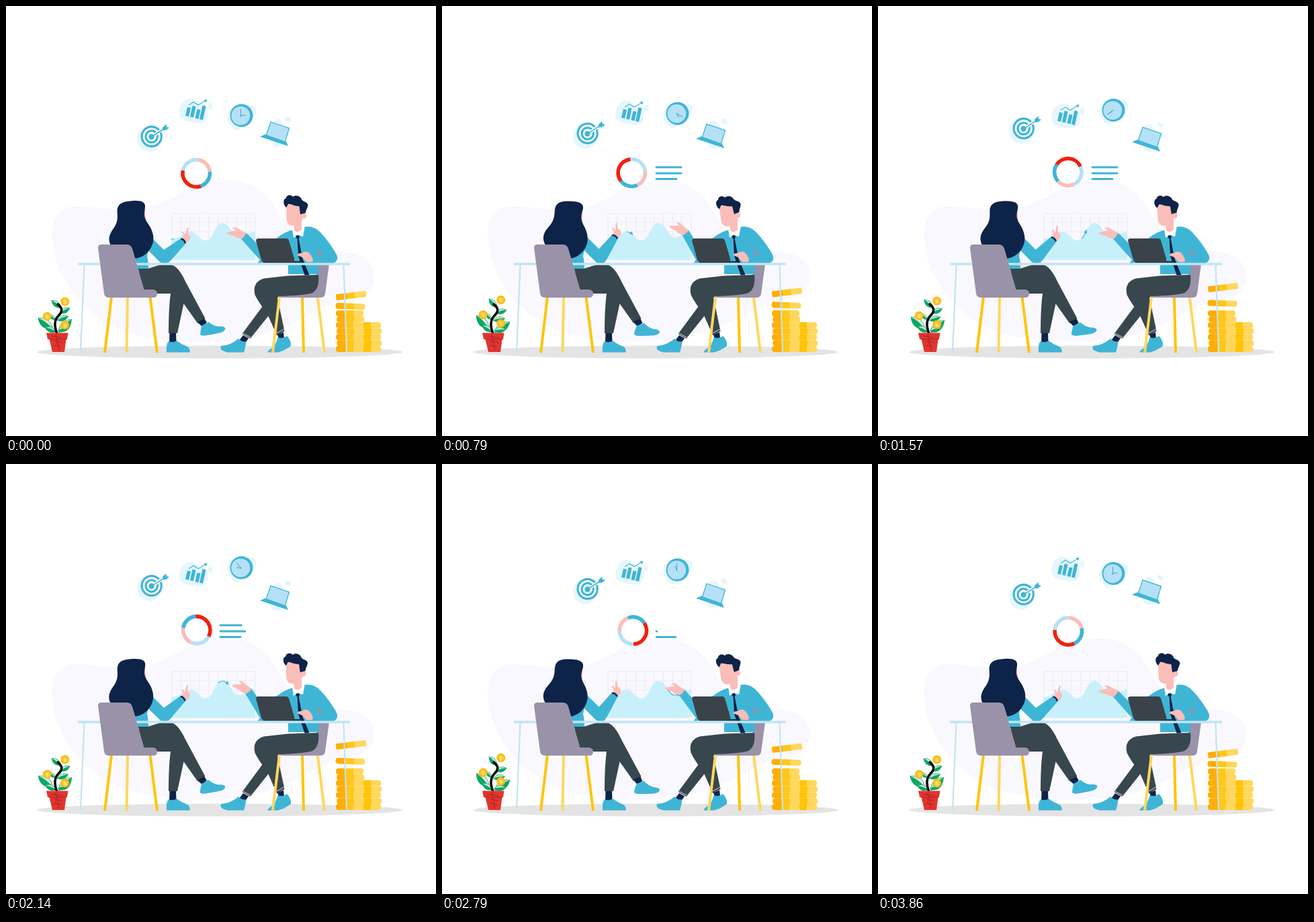
An HTML page for the animation above (3.93 s loop, 640x640 px).

```html
<!DOCTYPE html>
<html lang="en">
<head>
<meta charset="utf-8">
<style>
  html, body { margin: 0; width: 100%; height: 100%; overflow: hidden; background: #fff; }
  svg { display: block; width: 100vw; height: 100vh; }
  text { font: bold 8px "Liberation Sans", Arial, sans-serif; fill: #fff3b8; text-anchor: middle; }
  .teal { fill: #3fb5d6; } .navy { fill: #0e2348; } .skin { fill: #fbbdb7; }
  .dark { fill: #38464d; } .grey { fill: #9a92a9; } .pale { fill: #e6f6fd; } .sky { fill: #b5e1f7; }
  .line { fill: none; stroke: #3fb5d6; }
  .desk { stroke: #c2e4f1; }
  .gold { stroke: #ffc405; stroke-width: 4; } .lemon { stroke: #ffd75c; stroke-width: 4; }
</style>
</head>
<body>
<svg viewBox="0 0 640 640">
  <defs>
    <linearGradient id="coin">
      <stop offset=".36" stop-color="#ffae06"/><stop offset=".36" stop-color="#ffc71a"/>
      <stop offset=".63" stop-color="#ffc71a"/><stop offset=".63" stop-color="#ffd75c"/>
    </linearGradient>
    <linearGradient id="coin2">
      <stop offset=".36" stop-color="#ffd75c"/><stop offset=".36" stop-color="#ffc405"/>
      <stop offset=".63" stop-color="#ffc405"/><stop offset=".63" stop-color="#ffd75c"/>
    </linearGradient>
  </defs>

  <path fill="#f9f8ff" d="M68 340C68 310 85 296 110 298C150 301 180 307 212 300C250 290 280 259 330 259C375 259 398 290 415 325C430 355 460 362 500 365C535 368 550 385 548 405C545 430 525 434 495 441C450 453 430 480 360 494C290 505 220 500 170 482C110 455 70 400 68 340Z"/>
  <ellipse cx="318" cy="515" rx="272" ry="9.5" fill="#e4e4e4"/>

  <path id="grid" fill="none" stroke="#ebe7f6" stroke-width=".9"/>
  <path fill="#c8f0fa" d="M246 378V347C262 346 264 336 275 336C286 337 287 349 298 349C309 348 310 323 322 323C334 323 336 344 346 344C356 344 358 337 371 336V378Z"/>
  <path id="wave" class="line" stroke-width="1.2" d="M246 347C262 346 264 336 275 336C286 337 287 349 298 349C309 348 310 323 322 323C334 323 336 344 346 344C356 344 358 337 371 336"/>
  <path id="tip" class="teal" d="M0 0L-5 -2.8V2.8Z"/>

  <g id="target">
    <path class="pale" d="M197 190C203 176 222 176 230 186C238 198 226 217 213 217C198 215 192 203 197 190Z"/>
    <circle cx="216.7" cy="194.2" r="14.6" fill="#fff" stroke="#3fb5d6" stroke-width="3.2"/>
    <circle cx="216.7" cy="194.4" r="8.700" class="line" stroke-width="3.2"/>
    <circle cx="216.5" cy="194.7" r="4.200" class="teal"/>
    <path d="M221 192L234 183" stroke="#fff" stroke-width="4.5"/>
    <path class="line" stroke-width="1.6" d="M216 195L238 181"/>
    <path class="teal" d="M233 181L238 176L239 180L243 181L238 185L233 185Z"/>
  </g>

  <g id="chart">
    <path class="pale" d="M264 143C270 135 281 137 286 143C292 147 302 148 300 160C302 172 292 175 282 174C270 172 258 170 258 160C258 153 260 147 264 143Z"/>
    <ellipse class="pale" cx="304" cy="149" rx="3.5" ry="5.5"/>
    <path class="line" stroke-width="5.2" d="M269.5 164L272.5 151M276.5 165.5L280 149M284 167.5L287 154M290.5 169L295 148.500"/>
    <path class="line" stroke-width="1.1" d="M272 147.500L279 143L286 147.500L297 141"/>
    <path class="teal" d="M294.500 140L299.500 139L298 144Z"/>
  </g>

  <g id="clock">
    <path class="pale" d="M331 158C336 148 350 148 360 149C370 146 375 152 372 160C368 172 356 176 348 183C340 188 336 180 332 174C328 168 329 163 331 158Z"/>
    <circle cx="350.5" cy="163" r="17" class="teal"/>
    <circle cx="349.3" cy="163.3" r="13.9" class="sky"/>
    <path id="minute" class="line" style="stroke:#3d9fc0" stroke-width=".9" d="M349.500 164.500V153"/>
    <path id="hour" class="line" style="stroke:#3d9fc0" stroke-width=".9" d="M349.500 165V157"/>
  </g>

  <g id="laptop">
    <path class="pale" d="M396 176C398 166 408 165 411 174L418 200C414 210 402 212 396 206Z"/>
    <ellipse class="pale" cx="420" cy="169" rx="5" ry="3.6" transform="rotate(30 420 169)"/>
    <path class="sky" stroke="#3fb5d6" stroke-width="1.3" d="M394 172.500L421.500 182L415 203L387 193Z"/>
    <path class="teal" d="M378 194.500L386 191L417 202L420 208.500Z"/>
  </g>

  <g id="donut" fill="none" stroke-width="5.6"></g>
  <path id="bars" class="line" stroke-width="2.8" stroke-linecap="round"/>

  <!-- plant -->
  <g id="leaves"></g>
  <path fill="none" stroke="#0a0a0c" stroke-width="3.6" d="M76 488C71 475 72 467 78 461C85 454 84 449 76 443"/>
  <path fill="#e3342f" d="M60 486.500H92.500L91 496H89.500L87 515H69L64.500 496H62Z"/>
  <path stroke="#9b2228" stroke-width=".9" fill="none" d="M64 496H90M67 491L84 494M72 499L84 501M71 505L82 507M74 488L79 513"/>
  <g id="fruit"></g>

  <!-- coin stacks -->
  <g id="stack"></g>
  <rect id="coinB" x="490.500" y="442.500" width="44" height="9" rx="4" fill="url(#coin)"/>
  <rect id="coinA" x="491" y="426.500" width="45" height="9" rx="1.5" fill="url(#coin)"/>

  <!-- woman -->
  <path class="teal" d="M188 350H215L210 372Q212 380 212 393H195Z"/>
  <path class="teal" d="M214 342L236 364L243 381Q234 387 226 378L208 360Z"/>
  <g id="arm">
    <path class="teal" d="M232 365L260 346L268 353L245 379Q237 387 229 381Z"/>
    <path class="skin" d="M263 348C262 344 264 341 267 340L269.500 331Q271.500 328.500 272 331L270.500 339Q275 341 274 346Q272 352 267 353Z"/>
    <path stroke="#fbbdb7" stroke-width="2.4" stroke-linecap="round" d="M267 344L263.500 337"/>
    <path stroke="#0e2348" stroke-width="2.4" fill="none" d="M260.500 346.500Q265 347 267 353"/>
  </g>
  <g id="hair">
    <path class="skin" d="M203 304H207L208 318H203Z"/>
    <path class="navy" d="M165.500 305C166 293 175 291 188 290C202 289 208 292 207 300C206 308 204 312 210 322C222 338 222 352 213 364C205 374 195 377 185 375L160 362C150 350 153 341 160 331C167 321 166 315 165.500 305Z"/>
  </g>
  <path class="dark" d="M197 391H211C222 388 231 383.500 241 383.500C253 385 260 395 267 410L296.500 465L285 472L264.500 443L255 487H242Q242 450 245 428H203Z"/>
  <path class="navy" d="M243.500 487H253L253.500 501H243Z"/>
  <path class="teal" d="M239 515.500Q238 503 242 499Q249 502 254 498Q262 504 268 506Q275 509 273.500 515.500Z"/>
  <g id="foot">
    <path class="navy" d="M285 471L295 465L299 471L292 477Z"/>
    <path class="teal" d="M289 489Q290 478 292 475Q298 474 301 470Q308 476 316 477Q325 476 326.500 480Q326 485 316 487L300 490Q292 492 289 489Z"/>
  </g>
  <path class="gold" d="M157 433L147 516M214.500 433L225 516"/>
  <path class="lemon" d="M181 433L179.500 516"/>

  <!-- man -->
  <path class="grey" d="M463 384H481L475 428Q474 434 468 434H404V420H462Z"/>
  <path class="gold" d="M441 434L443 516"/>
  <path class="lemon" d="M464 434L474 516"/>
  <path class="dark" d="M404 430L394 457L363.500 495L351.500 488L384 444L386 430Z"/>
  <path class="dark" d="M465 400L420 401.500L384 405.500Q366 411 370.500 430Q377 443 388 456L403 490L414.500 484L404 434L406 432Q444 431 456 427Q467 421 465 400Z"/>
  <path class="navy" d="M347 498L353 490L361 494.500L355 503ZM404 489L413 485.500L414 494L406 496Z"/>
  <path stroke="#fff" stroke-width=".8" d="M352.500 487L364 493M402.500 487L414 481"/>
  <path class="teal" d="M320 506Q335 505 346 495Q352 501 357.500 499Q357 506 354 515.500H330Q317 513 320 506ZM389 515.500Q392 510 398 508Q403 500 404.500 493Q412 496 418 491Q425 498 424 506Q415 513 405 515.500Z"/>
  <path class="lemon" d="M407 433L397 516"/>

  <g id="reach">
    <path class="teal" d="M348.500 345L357 337L384 364L378 378Z"/>
    <path class="skin" d="M358 338L348 333Q342 328 337 330L342 334L329 337Q328 340 331 340L340 343Q346 347 352 346Z"/>
  </g>
  <path class="teal" d="M402 346Q415 336 427 333L434 342L444 329Q457 326 468 337Q482 352 492 370Q496 379 487 383H465V399H420V383H374Z"/>
  <path fill="#fff" d="M426 332L428 345L434 341L442 343L444.500 330L440 328H428Z"/>
  <path class="skin" d="M428 320L429 334Q434 339 440 333V316Z"/>
  <g id="head">
    <circle class="skin" cx="442.500" cy="312" r="4.500"/>
    <path class="skin" d="M417 296L417.500 317Q418 327 427 327Q436 327 441 318V294Z"/>
    <path class="navy" d="M413.500 294C413 289 414 287 417 286C417 281 425 280 427 284C432 280 439 284 440 288C443 292 448 291 449.500 296C449 301 446 304 446 308L438 310L436.500 298C428 298 424 294 420 295L417 300Q414 297 413.500 294Z"/>
  </g>
  <circle class="navy" cx="434.200" cy="343.500" r="2.600"/>
  <path class="navy" d="M433.500 345H435.500L441 375L451.500 400.500H444.500L435 372Z"/>
  <path class="grey" d="M465 361L471.500 370.500L463 370Z"/>
  <path class="skin" d="M433 371Q436 367 440 368Q448 362 454 371Q459 379 455 381H447L441 374Z"/>
  <path d="M383 381H441" stroke="#23303a" stroke-width="2.600"/>
  <path fill="#3b434a" d="M372 349Q372 346 376 346H417Q420 346 421 349L429 376Q430 381 427 381H384Q381 381 380 378Z"/>

  <path class="desk" stroke-width="3.400" d="M107 384H512"/>
  <path class="desk" stroke-width="2.200" d="M116.500 385L111 515M502.500 385L507 515"/>
  <path class="grey" d="M137 360Q137 355 142 355H180Q186 355 188 361L205.500 422H219Q225 423 225 428Q225 434 219 434H154Q147 434 146 428Z"/>
</svg>
<script>
const LOOP = 3930;
const $ = id => document.getElementById(id);
const set = (id, name, value) => $(id).setAttribute(name, value);
const move = (id, y) => set(id, 'transform', `translate(0 ${y})`);
const turn = (id, deg, x, y) => set(id, 'transform', `rotate(${deg} ${x} ${y})`);
const clamp = v => Math.max(0, Math.min(1, v));
const smooth = (t, a, b) => { const u = clamp((t - a) / (b - a)); return u * u * (3 - 2 * u); };

let grid = 'M247 308.500H371M247 322H371M247 336H371M247 349.500H371';
for (let i = 0; i < 10; i++) grid += `M${247 + i * 13.75} 308.500V370`;
set('grid', 'd', grid);

// Donut arcs: colour, start and end in degrees clockwise from the top.
const rim = deg => {
  const a = deg * Math.PI / 180;
  return `${283.2 + 20.2 * Math.sin(a)} ${249 - 20.2 * Math.cos(a)}`;
};
$('donut').innerHTML = [['#b5e1f7', -78, 10], ['#fbbdb7', 10, 83], ['#3fb5d6', 83, 160], ['#f0210f', 160, 282]]
  .map(([c, a, b]) => `<path stroke="${c}" d="M${rim(a)}A20.2 20.2 0 0 1 ${rim(b)}"/>`).join('');

// Leaves: base x, base y, length, direction.
const leaves = [[70, 481, 28, 216], [78, 486, 28, -45], [75, 485, 18, 200], [77, 483, 18, -14],
  [82, 449, 18, 216], [80, 457, 17, -26], [76, 468, 18, -20], [74, 467, 13, 215]];
$('leaves').innerHTML = leaves.map(([, , n, deg]) => {
  const side = deg > 90 ? 1 : -1, w = n * .46;
  return `<g><path fill="#d3ece3" d="M0 0Q${n * .5} ${w * side} ${n} 0Z"/>` +
    `<path fill="#0da765" d="M0 0Q${n * .5} ${-w * side} ${n} 0Q${n * .6} ${w * side * .3} 0 0Z"/>` +
    `<path fill="none" stroke="#0da765" stroke-width=".7" d="M0 0Q${n * .5} ${w * side} ${n} 0"/></g>`;
}).join('');

$('fruit').innerHTML = [[87.7, 440], [61.2, 462], [87.7, 475]].map(([x, y]) =>
  `<g transform="translate(${x} ${y})"><circle r="6.500" fill="#fcb708"/><circle r="4.800" fill="#ffc62b"/><text y="2.900">$</text></g>`).join('');

const pile = (x, rows, fill) => {
  let out = '';
  for (let i = 0; i < rows; i++)
    out += `<rect x="${x + i % 2 * 1.2}" y="${506 - i * 8.85}" width="41" height="9" rx="4" fill="url(#${fill})"/>`;
  return out;
};
$('stack').innerHTML = pile(491, 7, 'coin') + pile(517, 5, 'coin2');

// Text bars: y, full length, growth start and end, retreat start and end.
const bars = [[240, 37, 60, 420, 1980, 2640], [249, 37, 200, 580, 2240, 2850], [257.5, 30, 350, 730, 2700, 3450]];

const wave = $('wave'), waveLength = wave.getTotalLength();

function drawTrail(t) {
  const end = waveLength * t / 3240 + 4, start = Math.max(0, end - 6 - t * .006);
  const stop = Math.min(end, waveLength);
  wave.style.strokeDasharray = `${Math.max(0, stop - start)} 999`;
  wave.style.strokeDashoffset = -start;
  wave.style.visibility = start < waveLength ? 'visible' : 'hidden';
  const p = wave.getPointAtLength(stop), q = wave.getPointAtLength(stop - 2);
  const deg = Math.atan2(p.y - q.y, p.x - q.x) * 180 / Math.PI;
  set('tip', 'transform', `translate(${p.x} ${p.y}) rotate(${deg})`);
  set('tip', 'visibility', t > 250 && end < waveLength + 5 ? 'visible' : 'hidden');
}

function draw(t) {
  const phase = t / LOOP, spin = 360 * phase;
  const bob = Math.cos(2 * Math.PI * phase) - 1;
  const sway = (1 - Math.cos(4 * Math.PI * phase)) / 2;
  const wag = t < 3140 ? (1 - Math.cos(2 * Math.PI * t / 1570)) / 2 : 0;

  move('target', 6.6 * bob);
  move('chart', -4.2 * bob);
  move('clock', 4.4 * bob);
  move('laptop', -4.4 * bob);
  set('coinA', 'transform', `translate(0 ${6.6 * bob}) rotate(-7 513.500 431)`);
  set('coinB', 'transform', `translate(0 ${2.4 * bob}) rotate(2 512.500 447)`);

  turn('donut', spin, 283.3, 248);
  turn('hour', 80 + spin, 349.5, 163.5);
  turn('minute', 360 * clamp(t / 2400), 349.5, 163.5);

  turn('hair', 7.5 * sway, 185, 324);
  turn('arm', -14.5 * sway, 234, 375);
  turn('foot', 10 * sway, 292, 468);
  turn('head', -7.8 * sway, 434, 335);
  turn('reach', 13 * wag, 378, 378);
  [...$('leaves').children].forEach((leaf, i) => {
    const [x, y, , deg] = leaves[i];
    leaf.setAttribute('transform', `translate(${x} ${y}) rotate(${deg + 12 * sway})`);
  });
  move('fruit', -2.8 * sway);

  set('bars', 'd', bars.map(([y, n, a, b, c, d]) => {
    const w = n * (smooth(t, a, b) - smooth(t, c, d));
    return w > .5 ? `M319 ${y}h${w}` : '';
  }).join(''));
  drawTrail(t);
}

function tick() {
  draw(performance.now() % LOOP);
  requestAnimationFrame(tick);
}
tick();
</script>
</body>
</html>
```
